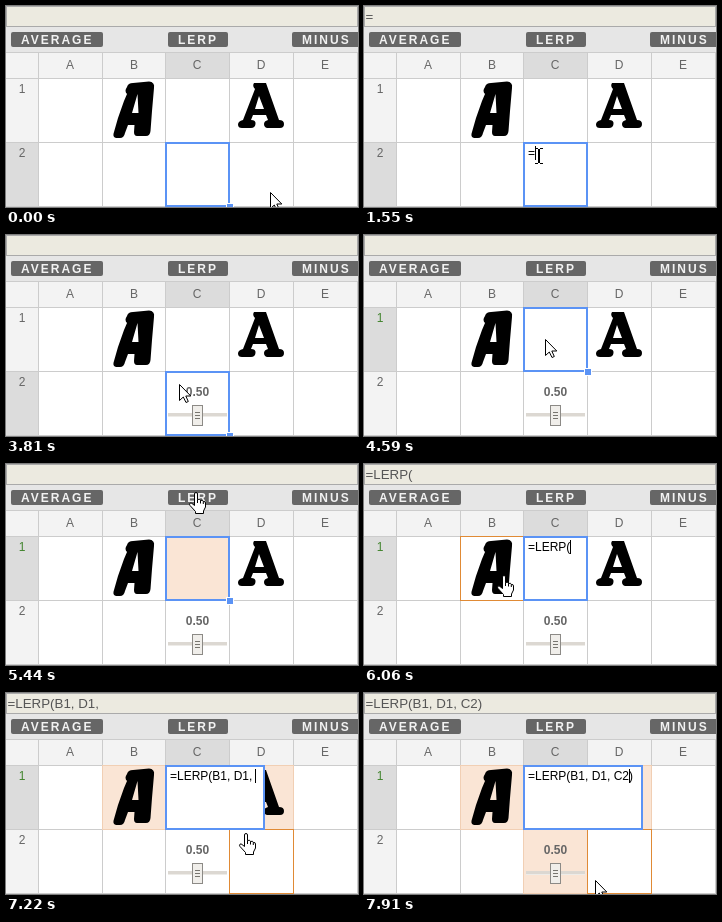
An HTML page with a canvas for the animation above (7.99 s loop, 352 by 201 pixels).

```html
<!DOCTYPE html>
<html lang="en">
<head>
<meta charset="utf-8">
<title>Spreadsheet lerp</title>
<style>
html, body { margin: 0; width: 100%; height: 100%; overflow: hidden; background: #fff; }
canvas { display: block; }
</style>
</head>
<body>
<canvas id="stage" width="352" height="201"></canvas>
<script>
const ctx = document.getElementById('stage').getContext('2d');
const LOOP = 7990;
const SANS = '"Liberation Sans", Arial, sans-serif';
const BLUE = '#5b93f5', PEACH = '#fae5d5', ORANGE = '#e08a35';
const colX = [32, 96, 159, 223, 287, 351];
const rowY = [72, 136, 200];

// [time, pointer, x, y], each held until the next
const pointerKeys = [
  [0, 'arrow', 264, 186], [70, 'arrow', 246, 158], [150, 'arrow', 214, 130],
  [230, 'arrow', 184, 124], [300, 'arrow', 173, 149],
  [1550, 'beam', 175, 150], [1630, 'hand', 175, 149], [3810, 'arrow', 173, 149],
  [4280, 'arrow', 174, 140], [4350, 'arrow', 178, 120], [4420, 'arrow', 181, 104],
  [4740, 'arrow', 184, 60], [4820, 'arrow', 188, 14],
  [5050, 'hand', 189, 27], [5130, 'hand', 190, 31], [5290, 'hand', 190, 30], [5440, 'hand', 190, 28],
  [5750, 'arrow', 186, 50], [5830, 'beam', 178, 83], [5910, 'beam', 164, 97],
  [5980, 'hand', 147, 107], [6060, 'hand', 140, 111],
  [6440, 'beam', 168, 106], [6520, 'beam', 206, 100], [6600, 'hand', 248, 98], [6680, 'hand', 267, 98],
  [7010, 'hand', 265, 104], [7080, 'hand', 260, 118], [7150, 'hand', 240, 140],
  [7230, 'hand', 221, 156], [7300, 'hand', 210, 165], [7380, 'hand', 206, 168], [7530, 'hand', 205, 166],
  [7910, 'arrow', 231, 187]
];

const textKeys = [
  [0, ''], [1550, '='], [2420, '=S'], [2570, '=SL'], [2720, '=SLI'], [2800, '=SLID'],
  [2950, '=SLIDE'], [3030, '=SLIDER'], [3180, '=SLIDER('], [3350, '=SLIDER()'], [3810, ''],
  [5670, '=LERP('], [6210, '=LERP(B1'], [6290, '=LERP(B1, '],
  [6850, '=LERP(B1, D1'], [6930, '=LERP(B1, D1, '], [7680, '=LERP(B1, D1, C2)']
];

// [column, row, time it becomes referenced]
const references = [[1, 0, 6210], [3, 0, 6850], [2, 1, 7680]];

const slantedA = new Path2D(`M121 81Q122 77 127 77L143 75.5Q149 76 148 82L146 105L144.5 125
  Q144 130 140 130H131Q128 130 128 126L128.5 119H122L119 127Q118 132 114 132H110Q106 131 108 126
  L112 112L118 95L121 88Q118 85 121 81Z M131.5 88L132.5 107H126Z`);
const serifA = new Path2D(`M248 77H260L273 114Q278 114 278 118Q278 122 274 122H261Q258 121 258 118
  Q258 115 262 114L260 109H247L245 114Q250 114 249.5 118Q249 122 245 122H236Q232 122 232 118.5
  Q232 115 237 114L249 83Q246 80 248 77Z M253 90L258 103H249Z`);
const arrow = new Path2D('M.5 .5V16.5L4.3 13L7 18.5L9.3 17.5L6.8 12H11.8Z');
const hand = new Path2D(`M-1.5 12V2Q-1.5 .5 0 .5T1.5 2V7.5Q4 6.5 4.5 8.5Q7 7.5 7.3 9.5Q9.5 9 9.5 11V15
  L7.5 19V21.5H-.5V19.5L-6 13.5Q-7 12 -6 11.2T-4 11.5L-1.5 13.5Z
  M1.5 7.5V11M4.5 8.5V11.5M7.3 9.5V12`);

const latest = (keys, t) => keys.findLast(key => key[0] <= t);

function box(color, x, y, w, h) {
  ctx.fillStyle = color;
  ctx.fillRect(x, y, w, h);
}

function outline(color, x, y, w, h, width = 1) {
  ctx.strokeStyle = color;
  ctx.lineWidth = width;
  ctx.strokeRect(x, y, w, h);
}

function label(text, x, y, color, { size = 12, bold = false, align = 'left', spacing = 0 } = {}) {
  ctx.font = `${bold ? 'bold ' : ''}${size}px ${SANS}`;
  ctx.textAlign = align;
  ctx.letterSpacing = spacing + 'px';
  ctx.fillStyle = color;
  ctx.fillText(text, x, y);
}

function textWidth(text) {
  ctx.font = `12px ${SANS}`;
  ctx.letterSpacing = '0px';
  return ctx.measureText(text).width;
}

function button(text, x, width) {
  ctx.fillStyle = '#666';
  ctx.beginPath();
  ctx.roundRect(x, 26, width, 15, 2);
  ctx.fill();
  label(text, x + 10, 38, '#f2f2f2', { bold: true, spacing: 2 });
}

function toolbars(text) {
  box('#eceae0', 0, 0, 352, 21);
  outline('#aaa', .5, .5, 351, 20);
  label(text, 1.5, 15, '#555', { size: 13.333 });
  box('#e6e6e6', 0, 21, 352, 25);
  button('AVERAGE', 5, 92);
  button('LERP', 162, 60);
  button('MINUS', 286, 80);
}

function headers(row) {
  box('#f3f3f3', 0, 46, 352, 26);
  box('#f3f3f3', 0, 72, 32, 129);
  box('#dcdcdc', 159, 46, 64, 26);
  box('#dcdcdc', 0, rowY[row], 32, 64);
  [...'ABCDE'].forEach((name, i) => label(name, colX[i] + 32, 63, '#666', { align: 'center' }));
  label('1', 16, 87, row === 0 ? '#43852f' : '#666', { align: 'center' });
  label('2', 16, 151, '#666', { align: 'center' });
}

function gridLines() {
  for (const x of colX) box('#ccc', x, 46, 1, 155);
  for (const y of [46, ...rowY]) box('#ccc', 0, y, 352, 1);
}

function letters() {
  ctx.fillStyle = '#000';
  ctx.filter = 'blur(0.7px)';
  ctx.fill(slantedA, 'evenodd');
  ctx.fill(serifA, 'evenodd');
  ctx.filter = 'none';
}

function slider() {
  label('0.50', 191.5, 161, '#666', { bold: true, align: 'center' });
  box('#dcd8d2', 162, 178, 59, 4);
  box('#eeece8', 162, 181, 59, 1);
  box('#f0eeea', 186, 170, 11, 21);
  outline('#8c8a86', 186.5, 170.5, 10, 20);
  for (const y of [177, 180, 183]) box('#77756f', 189, y, 5, 1);
}

function selection(row) {
  const y = rowY[row];
  outline(BLUE, 160, y + 1, 63, 63, 2);
  box('#fff', 220, y + 61, 8, 8);
  box(BLUE, 221, y + 62, 6, 6);
}

function editor(text, row, right, caretOn) {
  const y = rowY[row];
  box('#fff', 159, y, right - 159, 65);
  outline(BLUE, 160, y + 1, right - 161, 63, 2);
  label(text, 164, y + 15, '#000');
  const beforeCaret = text.endsWith('C2)') ? text.slice(0, -1) : text;
  if (caretOn) box('#000', Math.floor(164 + textWidth(beforeCaret)), y + 4, 1, 14);
}

function pointer(kind, x, y) {
  ctx.save();
  ctx.translate(x, y);
  if (kind === 'beam') {
    for (const side of [-4, 1]) {
      box('#000', side, -8, 3, 1);
      box('#000', side, 7, 3, 1);
    }
    box('#000', -1, -7, 2, 14);
  } else {
    const shape = kind === 'hand' ? hand : arrow;
    ctx.fillStyle = '#fff';
    ctx.strokeStyle = '#000';
    ctx.lineWidth = 1;
    ctx.lineJoin = 'round';
    ctx.fill(shape);
    ctx.stroke(shape);
  }
  ctx.restore();
}

function draw(t) {
  const [, kind, px, py] = latest(pointerKeys, t);
  const text = latest(textKeys, t)[1];
  const row = t < 4590 ? 1 : 0;
  const picking = t >= 5670;
  const measured = text === '=SLIDER()' ? '=SLIDER(' : text;
  const right = Math.max(224, Math.round(164 + textWidth(measured) + 9.6));

  box('#fff', 0, 0, 352, 201);
  toolbars(text);
  headers(row);
  gridLines();

  for (const [col, r, since] of references) {
    if (t < since) continue;
    box(PEACH, colX[col] + 1, rowY[r] + 1, 63, 63);
    outline('#f1cfb4', colX[col] + .5, rowY[r] + .5, 64, 64);
  }
  if (t >= 5050 && !picking) {
    ctx.globalAlpha = Math.min(1, (t - 4970) / 320);
    box(PEACH, 161, 74, 61, 61);
    ctx.globalAlpha = 1;
  }

  letters();
  if (t >= 3810) slider();

  const overCells = px > 32 && py > 72;
  const overEditor = py < 136 && px >= 159 && px < right;
  if (picking && overCells && !overEditor) {
    const col = colX.findLastIndex(x => x <= px);
    outline(ORANGE, colX[col] + .5, rowY[py < 136 ? 0 : 1] + .5, 64, 64);
  }

  if (text) editor(text, row, right, t < 2100 || t >= 2420);
  else selection(row);
  pointer(kind, px, py);
}

function tick() {
  draw(performance.now() % LOOP);
  requestAnimationFrame(tick);
}
tick();
</script>
</body>
</html>
```
